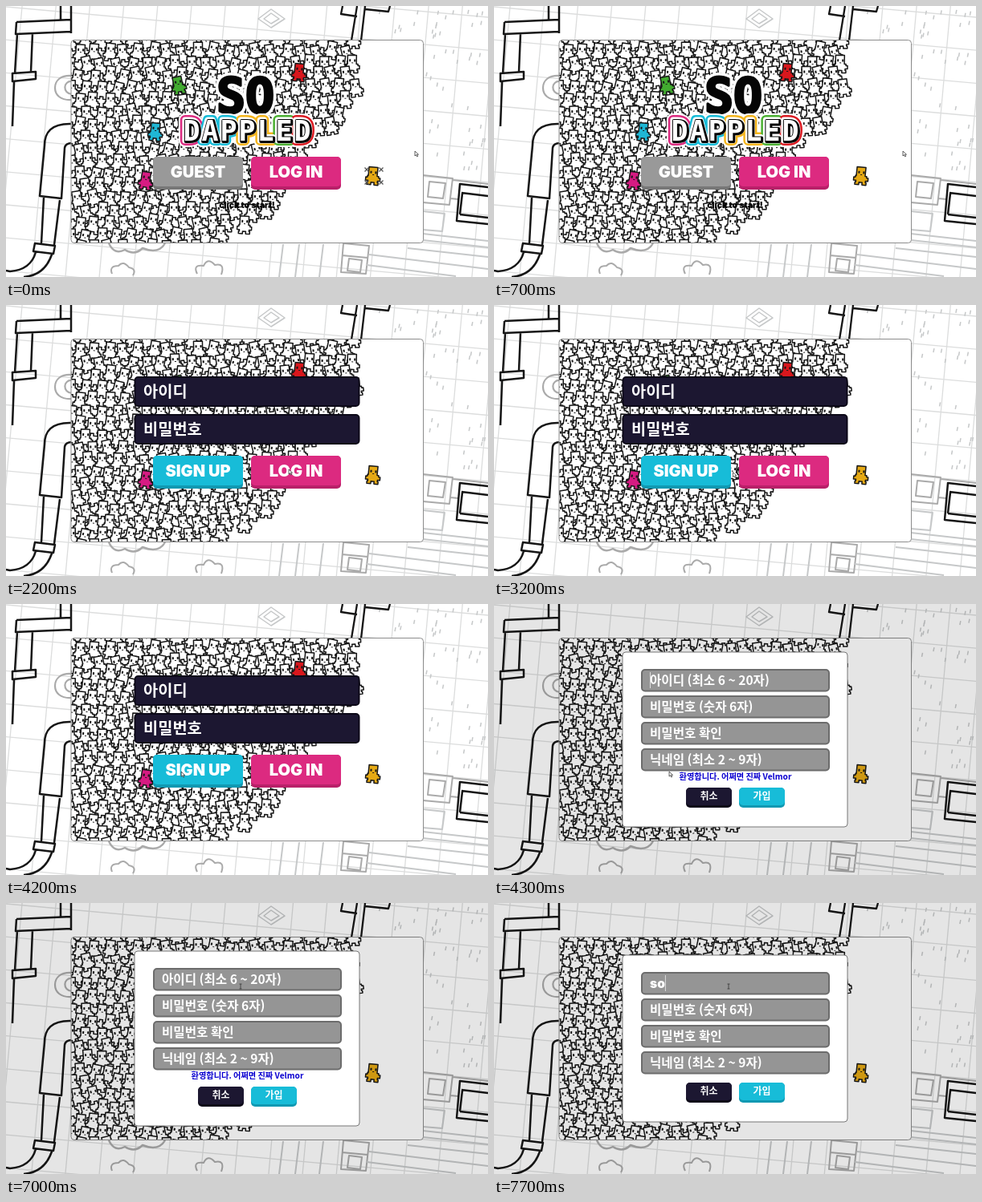
These frames come from a looping animation (600x338 px, 8 s). An HTML page with a canvas:

```html
<!DOCTYPE html>
<html lang="ko">
<head>
<meta charset="utf-8">
<style>
html, body { margin: 0; width: 100%; height: 100%; overflow: hidden; background: #fff; }
canvas { display: block; width: 100vw; height: 100vh; }
</style>
</head>
<body>
<canvas id="stage" width="600" height="338"></canvas>
<script>
const stage = document.getElementById('stage');
const LOOP = 8000;
const LATIN = 'Inter, "Noto Sans CJK KR", "Noto Sans CJK", sans-serif';
const KOREAN = '"Noto Sans CJK KR", "Noto Sans CJK", sans-serif';
const MONO = '"DejaVu Sans Mono", monospace';
const BLACK = '#161616', GRAY = '#c6c8c9', NAVY = '#1c1731', CYAN = '#17bcd8', PINK = '#dc2a80';

let ctx;

function seeded(seed) {
  return () => (seed = (seed * 16807) % 2147483647) / 2147483647;
}

function layer(paint) {
  const canvas = document.createElement('canvas');
  canvas.width = 600;
  canvas.height = 338;
  ctx = canvas.getContext('2d');
  paint();
  return canvas;
}

function line(path, color, width) {
  ctx.strokeStyle = color;
  ctx.lineWidth = width;
  ctx.stroke(new Path2D(path));
}

function box(x, y, w, h, r, fill, border, width = 1) {
  ctx.beginPath();
  ctx.roundRect(x, y, w, h, r);
  ctx.fillStyle = fill;
  ctx.fill();
  if (!border) return;
  ctx.strokeStyle = border;
  ctx.lineWidth = width;
  ctx.stroke();
}

function text(str, x, y, size, color, { align = 'left', family = KOREAN } = {}) {
  ctx.font = `900 ${size}px ${family}`;
  ctx.textAlign = align;
  ctx.fillStyle = color;
  ctx.fillText(str, x, y);
}

// ---- Static scenery ----

const BODY = new Path2D('M-6-11H5V0H7V2H9V6H6V8H7V11H2V8H-2V11H-7V8H-6V6H-9V2H-7V0H-6Z');

function buddy(x, y, tilt, color = '#fff') {
  ctx.save();
  ctx.translate(x, y);
  ctx.rotate(tilt);
  ctx.fillStyle = color;
  ctx.fill(BODY);
  ctx.strokeStyle = BLACK;
  ctx.lineWidth = 1.5;
  ctx.stroke(BODY);
  ctx.fillStyle = BLACK;
  ctx.fillRect(-4, -6, 2, 3);
  ctx.fillRect(2, -6, 2, 3);
  ctx.fillRect(-1, -2, 2, 1);
  ctx.restore();
}

function paintScenery() {
  const rand = seeded(41);
  ctx.fillStyle = '#fff';
  ctx.fillRect(0, 0, 600, 338);
  ctx.lineJoin = 'round';

  // Tilted paving and tufts of grass
  ctx.save();
  ctx.rotate(0.09);
  for (let i = -1; i < 16; i++) {
    line(`M${20 + i * 42}-70V360`, '#dcdddd', 1.3);
    line(`M-20 ${i * 41 - 40}H640`, '#dcdddd', 1.3);
  }
  ctx.restore();
  for (let i = 0; i < 34; i++) {
    const x = 524 + rand() * 74, y = 4 + rand() * 200;
    line(`M${x} ${y}l-1 5`, GRAY, 1.5);
  }
  for (let i = 0; i < 16; i++) {
    line(`M${460 + rand() * 135} ${4 + rand() * 34}l-1 5`, GRAY, 1.5);
  }

  // Grey props
  line('M330 4L347 16L330 27L314 16ZM330 9L340 16L330 22L321 16Z', GRAY, 1.5);
  line('M82 87C68 86 61 93 61 102S68 118 82 117M82 94C71 93 70 109 82 110', '#aaa', 2.2);
  line('M519 211L556 215L552 248L519 245M527 219L547 221L544 240L525 238ZM556 217L600 222M553 240L563 241', '#aaa', 2);
  line('M519 256L546 259L543 281L519 279M519 292L600 301M500 302L600 313M519 284L600 293', GRAY, 2);
  line('M420 296L452 299L448 334L417 332ZM427 315L443 317L441 332L425 330ZM418 311L450 314', '#aaa', 2);
  line('M452 310L600 328M449 323L560 337M345 297L340 338M365 297L360 338M395 297L390 338', GRAY, 2);
  line('M128 296Q135 311 148 304Q160 312 170 302Q190 310 198 296', '#aaa', 2.5);
  line('M132 334Q128 324 140 324Q146 317 153 326Q163 328 158 336M238 334Q232 322 246 324Q251 313 260 323Q273 320 268 335', '#aaa', 2);

  // Dark pipes
  line('M13 20L81 17M13 20L12 35L81 32M68 0V17M81 0V34M14 35L11 84M33 34L31 82M8 84L37 82V91L8 94ZM10 94L8 150', BLACK, 2.5);
  line('M82 147C56 146 48 158 48 174L42 237L69 240L73 177Q74 171 82 171M47 239L44 296M67 242L60 298M36 296L61 299L59 309L34 306ZM37 307Q31 329 5 331L0 330M57 310Q48 336 22 338', BLACK, 2.5);
  line('M437 0L430 43M447 0L442 43M419 0L417 10L437 13M478 0L476 7L447 4', BLACK, 2.3);
  line('M600 226L565 222L561 268L600 272M600 237L567 233M565 260L600 264M568 234L565 260', BLACK, 2.5);
}

// Right-hand limit of the crowd as [y, x] points
const EDGE = [[30, 448], [65, 434], [100, 447], [125, 440], [150, 410], [185, 372],
  [230, 345], [262, 322], [280, 282], [310, 250]];

function edgeAt(y) {
  const i = Math.max(1, EDGE.findIndex(p => p[0] >= y));
  const [y0, x0] = EDGE[i - 1], [y1, x1] = EDGE[i];
  return x0 + (x1 - x0) * (y - y0) / (y1 - y0);
}

function paintPanel() {
  const rand = seeded(7);
  box(81, 42.5, 438.5, 253, 4, '#fff');
  ctx.save();
  ctx.clip();
  for (let row = 0; row < 18; row++) {
    for (let col = 0; col < 22; col++) {
      const x = 82 + col * 18.5 + (row % 2) * 9 + rand() * 5 - 2.5;
      const y = 43 + row * 15.3 + rand() * 6 - 3;
      const tilt = rand() * 0.5 - 0.25;
      if (y < 305 && x < edgeAt(y)) buddy(x, y, tilt);
    }
  }
  buddy(215, 99, -0.2, '#42ab30');
  buddy(365, 83, 0.1, '#d9171d');
  buddy(186, 157, 0.1, '#1fb7d5');
  buddy(174, 218, 0.15, '#d61b82');
  ctx.restore();
  box(81, 42.5, 438.5, 253, 4, 'transparent', '#8c8c8c');
}

const backdrop = layer(() => { paintScenery(); paintPanel(); });

// ---- Interface ----

function button(label, x, y, w, h, color, shade, size, family) {
  const lip = h > 30 ? 4 : 3;
  box(x, y, w, h, 5, shade);
  box(x, y, w, h - lip, 5, color);
  text(label, x + w / 2, y + (h - lip) / 2 + size * 0.37, size, '#fff', { align: 'center', family });
}

const TITLE_COLORS = [PINK, CYAN, CYAN, '#f4b51d', '#f4b51d', '#4bb032', '#dc1b22'];

function title() {
  ctx.lineJoin = 'round';
  ctx.textAlign = 'center';
  ctx.font = `bold 60px ${MONO}`;
  ctx.strokeStyle = '#fff';
  ctx.lineWidth = 10;
  ctx.strokeText('SO', 298, 133);
  ctx.strokeStyle = ctx.fillStyle = '#050505';
  ctx.lineWidth = 3;
  ctx.strokeText('SO', 298, 133);
  ctx.fillText('SO', 298, 133);

  ctx.font = `bold 35px ${MONO}`;
  const letters = [...'DAPPLED'];
  const outline = (width, color, shift = 0) => letters.forEach((letter, i) => {
    ctx.strokeStyle = color || TITLE_COLORS[i];
    ctx.lineWidth = width;
    ctx.strokeText(letter, 231 + i * 23 + shift, 168 + shift);
  });
  outline(16, '#fff');
  outline(12);
  outline(7, '#fff');
  outline(4, '#050505', 1);
  ctx.fillStyle = '#fff';
  letters.forEach((letter, i) => ctx.fillText(letter, 231 + i * 23, 168));
}

function startScreen() {
  title();
  button('GUEST', 183, 188, 112, 41, '#999', '#777', 20, LATIN);
  button('LOG IN', 305, 188, 112, 41, PINK, '#b92069', 20, LATIN);
  text('click to start!', 300, 252, 10.5, '#000', { align: 'center', family: LATIN });
}

function loginScreen() {
  [['아이디', 90], ['비밀번호', 137]].forEach(([label, y]) => {
    box(160.5, y, 279, 36, 4, NAVY, '#0c0918', 2);
    text(label, 171, y + 25, 19.8, '#fff');
  });
  button('SIGN UP', 183, 188, 112, 41, CYAN, '#1099b2', 20, LATIN);
  button('LOG IN', 305, 188, 112, 41, PINK, '#b92069', 20, LATIN);
}

const FIELDS = ['아이디 (최소 6 ~ 20자)', '비밀번호 (숫자 6자)', '비밀번호 확인', '닉네임 (최소 2 ~ 9자)'];

function signUpScreen(t) {
  const typed = t < 7400 ? '' : t < 7600 ? 's' : 'so';
  const shift = typed ? 5 : 0;
  box(160, 60 + shift, 280, 218 - 2 * shift, 4, '#fff', '#777');
  FIELDS.forEach((label, i) => {
    const y = 82 + shift + i * 33;
    box(184, y, 233, 26.5, 4, '#959595', '#6c6c6c', 2);
    const value = i === 0 && typed;
    text(value || label, 194, y + 19, 15.6, '#fff', { family: value ? LATIN : KOREAN });
  });

  const blinkOn = Math.floor((t - 4350) / 520) % 2 === 0;
  if (typed || t < 4400 || blinkOn) {
    ctx.font = `900 15.6px ${LATIN}`;
    ctx.textAlign = 'left';
    ctx.fillStyle = '#ddd';
    ctx.fillRect(194 + ctx.measureText(typed).width, 85 + shift, 1, 20);
  }
  if (!typed) {
    text('환영합니다. 어쩌면 진짜 Velmor', 300.5, 218.5, 10.2, '#0b00d0', { align: 'center' });
  }
  button('취소', 239, 229 - shift, 57, 25, NAVY, '#0c0918', 12);
  button('가입', 305, 229 - shift, 57, 25, CYAN, '#1099b2', 12);
}

// ---- Motion ----

const WAVES = [[0, 600], [5100, 5400], [6600, 6900], [7600, 7690]];

function yellowBuddy(t) {
  buddy(457, 212, 0.1, '#e5a914');
  if (!WAVES.some(([from, to]) => t >= from && t < to)) return;
  for (const x of [449, 467]) {
    for (const y of [204, 220]) {
      line(`M${x - 2.5} ${y - 2.5}l5 5m0-5l-5 5`, '#555', 1.3);
    }
  }
}

// Pointer keys: time, x, y
const POINTER = [[0, 509, 181], [1000, 509, 181], [1800, 352, 205], [2500, 352, 205], [2700, 334, 208],
  [2900, 334, 208], [3700, 219, 210], [4400, 218, 209], [4900, 255, 150], [5100, 255, 150],
  [5400, 292, 104], [LOOP, 292, 104]];

function pointer(t) {
  const i = POINTER.findIndex(key => key[0] > t);
  const [t0, x0, y0] = POINTER[i - 1], [t1, x1, y1] = POINTER[i];
  const k = (t - t0) / (t1 - t0), ease = k * k * (3 - 2 * k);
  const x = x0 + (x1 - x0) * ease, y = y0 + (y1 - y0) * ease;
  if (t > 5300) {
    line(`M${x - 1.5} ${y - 3}h3m-1.5 0v6m-1.5 0h3`, '#333', 0.8);
    return;
  }
  const arrow = new Path2D(`M${x} ${y}v6l1.4-1.3 1.3 2.3 1-.6-1.2-2.2h2Z`);
  ctx.fillStyle = '#fff';
  ctx.fill(arrow);
  ctx.strokeStyle = '#222';
  ctx.lineWidth = 0.7;
  ctx.stroke(arrow);
}

const screen = stage.getContext('2d');

function draw(now) {
  const t = now % LOOP;
  ctx = screen;
  ctx.drawImage(backdrop, 0, 0);
  yellowBuddy(t);
  if (t < 2200) {
    startScreen();
  } else if (t < 4300) {
    loginScreen();
  } else {
    ctx.fillStyle = 'rgba(0, 0, 0, 0.1)';
    ctx.fillRect(0, 0, 600, 338);
    signUpScreen(t);
  }
  pointer(t);
  requestAnimationFrame(draw);
}

const start = performance.now();
const tick = draw;
draw = () => tick(performance.now() - start);
draw();
</script>
</body>
</html>
```
